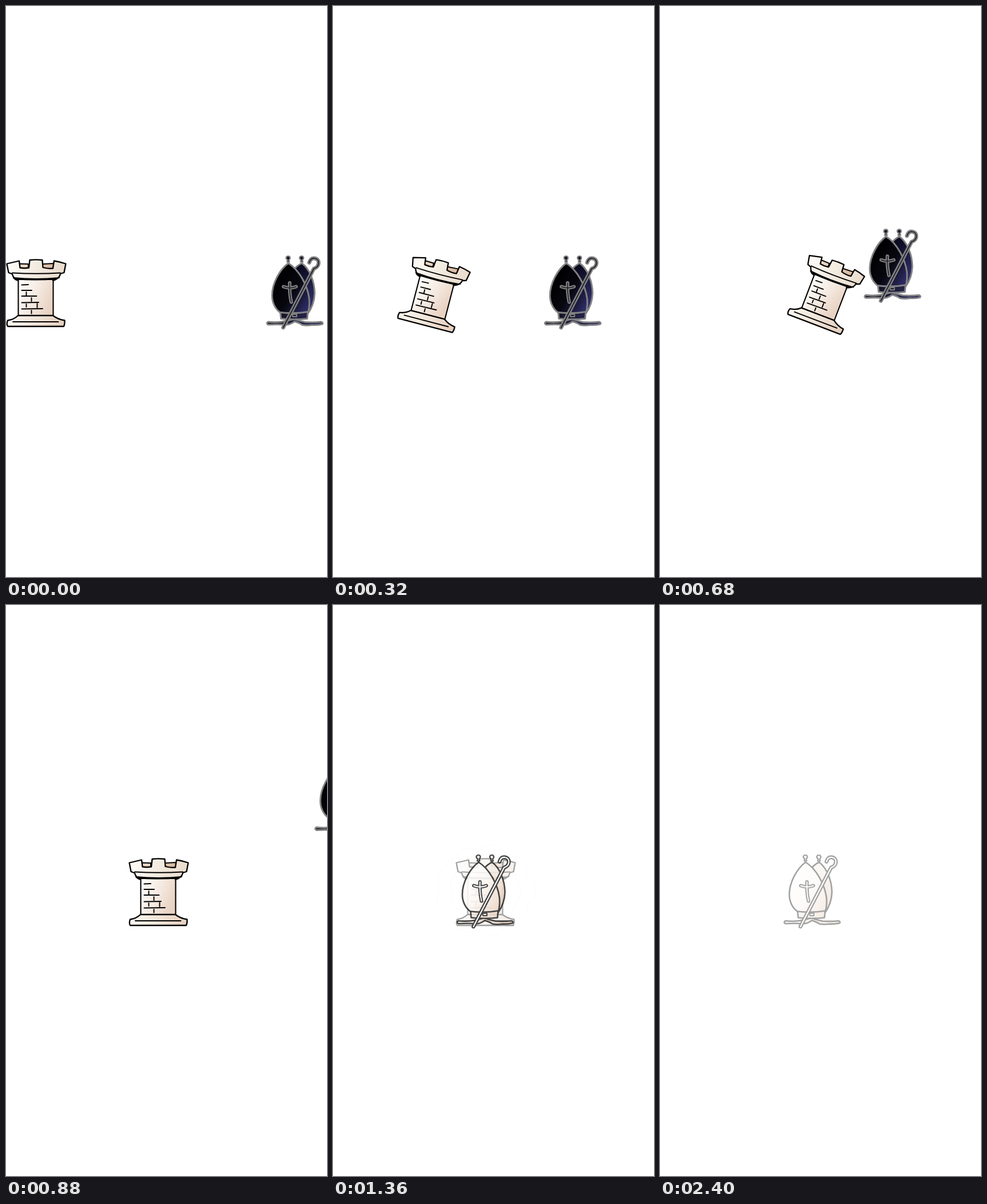
Write an HTML page with a canvas that moves like this. It is 561 px wide and 998 px high and loops after 2440 ms.

```html
<!DOCTYPE html>
<html lang="en">
<head>
<meta charset="utf-8">
<title>Rook takes bishop</title>
<style>
  html, body { margin: 0; width: 100%; height: 100%; overflow: hidden; background: #fff; }
  canvas { display: block; width: 561px; height: 998px; }
</style>
</head>
<body>
<canvas id="stage" width="561" height="998"></canvas>
<script>
const W = 561, H = 998, LOOP = 2440, STEP = 40;
const screen = document.getElementById('stage').getContext('2d');
const layer = document.createElement('canvas');
layer.width = W;
layer.height = H;
const pen = layer.getContext('2d');

const clamp = v => Math.max(0, Math.min(1, v));
const progress = (t, from, to) => clamp((t - from) / (to - from));

function gradient(x0, y0, x1, y1, ...colors) {
  const g = pen.createLinearGradient(x0, y0, x1, y1);
  colors.forEach((c, i) => g.addColorStop(i / (colors.length - 1), c));
  return g;
}

function shape(d, fill, stroke, width) {
  const path = new Path2D(d);
  if (fill) {
    pen.fillStyle = fill;
    pen.fill(path);
  }
  if (stroke) {
    pen.strokeStyle = stroke;
    pen.lineWidth = width;
    pen.stroke(path);
  }
}

// A line with an outer edge and a lighter or darker core
function tube(d, edge, core, outer, inner) {
  shape(d, null, edge, outer);
  shape(d, null, core, inner);
}

const ROOK = {
  notches: 'M237 450.5L253 451V459H237ZM278 451L297 450V460H278Z',
  crown: 'M215.5 450.5L237 445.5L238.5 457.5Q246 459 254 457.5L255.5 444Q266 442.8 277.5 444L278.5 457Q287 459.5 296 458.5L298 445.5Q308 447 318.5 450.5L315.5 466L309 468Q308 474 303 476.5Q267 480 231 477Q226 474 225 468.5L218.5 466Z',
  column: 'M235.5 478H296.5V541H235.5Z',
  base: 'M235 541H296Q305 548 316.5 549.5Q317 556 315 560H217Q214.5 556 217 549.5Q228 548 235 541Z',
  shade: 'M226 475Q230 477 236 477.5V481Q229 480 226 475ZM306 475Q301 477 295 477.5V481Q303 480 306 475Z',
  rims: 'M225 466.5Q267 469 309 466.5M227 475Q267 479 307 475M226 552H305.5',
  bricks: 'M241.5 487.5L253 487M241.5 497H259M241.5 507H267.5M241.5 518.5L271 518M241.5 529.5L278 529M249.5 500V506M258.5 510V516M249.5 521V526M268.5 520V527M258.5 532V537.5'
};

function drawRook() {
  const ink = '#000';
  shape(ROOK.notches, gradient(237, 450, 297, 450, '#ead9c8', '#d9b9a0'), ink, 2);
  shape(ROOK.column, gradient(235, 490, 296, 515, '#fffdfa', '#f5eae2', '#e8d2c2'), ink, 2.1);
  shape(ROOK.base, gradient(217, 545, 316, 560, '#fbf7f0', '#f0e4d8', '#e4cebd'), ink, 2.3);
  shape(ROOK.crown, gradient(216, 450, 318, 470, '#fefcf8', '#f3ebe0', '#e9dacb'), ink, 2.3);
  shape(ROOK.shade, ink);
  shape(ROOK.rims, null, ink, 1.9);
  shape(ROOK.bricks, null, ink, 1.9);
}

const BISHOP = {
  back: 'M262 463Q270 453 278 449.5C292 460 300 481 300.5 502C300 516 296 527 289 537L270 530Z',
  front: 'M254.5 449.5C240 460 226 484 226 506C226 519 232 530 240.5 536Q265 539 289 535.5Q292 525 291 512C288 488 273 461 254.5 449.5Z',
  band: 'M240.5 535.5Q265 538.5 288.5 534.5L287.5 546.5Q265 549 241.5 546.5Z',
  buckle: 'M261.5 539L269 538.5V543H262Z',
  foot: 'M219 552Q231 553.5 242 552Q253 550.5 264 547Q274 550.5 284 552.5Q298 553.5 312 552Q316 553.5 314 556Q306 558 296 557.5Q287 559 279 557.5Q271 552.5 265 551.5Q257 557.5 250 557Q235 556 219 557Q215 554.5 219 552Z',
  finial: 'M252 447.5L253 444Q250 442 250.5 439.5Q251.5 437 254 437Q257 437 257.5 439.5Q258 442 255.5 444L256.5 447.5Z',
  cross: 'M256.8 484Q256 501 259.5 517.5M246 490.5Q257 495 268 490.5',
  staff: 'M245.5 562L299 459C310 455.5 310 442 300 441C295.5 440.5 292.5 443.5 291 448.5'
};

const LIGHT = {
  ink: '#000', core: '#fff', line: 2.6, coreScale: 1,
  front: ['#ffffff', '#fbf5ef', '#e9d3c1'],
  back: ['#f5ebe1', '#e5cbb7'],
  foot: ['#f8f1ea', '#e0c2aa']
};
const DARK = {
  ink: '#828284', core: '#1c1c20', line: 2.9, coreScale: 0.75,
  front: ['#000002', '#07070f', '#2c2b62'],
  back: ['#0b0b20', '#302f66'],
  foot: ['#0c0c14', '#2f2e60']
};

function drawBishop(look) {
  const { ink, core, line, coreScale } = look;
  const trim = gradient(217, 540, 315, 556, ...look.foot);
  shape(BISHOP.back, gradient(268, 465, 300, 515, ...look.back), ink, line);
  shape(BISHOP.front, gradient(230, 485, 290, 522, ...look.front), ink, line);
  shape(BISHOP.foot, trim, ink, line);
  shape(BISHOP.band, trim, ink, line);
  shape(BISHOP.buckle, core, ink, 1.9);
  for (const dx of [0, 23.5]) {
    pen.save();
    pen.translate(dx, 0);
    shape(BISHOP.finial, trim, ink, 2.2);
    pen.restore();
  }
  tube(BISHOP.cross, ink, core, 6, 2 * coreScale);
  tube(BISHOP.staff, ink, core, 6.8, 2.2 * coreScale);
}

function drawSmoke(scale) {
  pen.translate(266, 498.5);
  pen.scale(scale, scale);
  const puffs = (rx, ry, r, color) => {
    pen.fillStyle = color;
    pen.beginPath();
    for (let i = 0; i < 9; i++) {
      const a = i * Math.PI * 2 / 9;
      const x = Math.cos(a) * rx, y = Math.sin(a) * ry;
      pen.moveTo(x + r, y);
      pen.arc(x, y, r, 0, Math.PI * 2);
    }
    pen.moveTo(rx, 0);
    pen.ellipse(0, 0, rx, ry, 0, 0, Math.PI * 2);
    pen.fill();
  };
  puffs(58, 50, 30, '#e4eef3');
  puffs(58, 50, 29, '#ffffff');
  puffs(38, 32, 25, '#d8e9f0');
  puffs(38, 32, 24, '#ffffff');
}

// Draws one object as a group so that its parts fade together
function group(draw, { x = 0, y = 0, angle = 0, alpha = 1 }) {
  if (alpha <= 0) return;
  const cx = 267.5, cy = 502;
  pen.setTransform(1, 0, 0, 1, 0, 0);
  pen.clearRect(0, 0, W, H);
  pen.translate(cx + x, cy + y);
  pen.rotate(angle);
  pen.translate(-cx, -cy);
  pen.lineJoin = pen.lineCap = 'round';
  draw();
  screen.globalAlpha = alpha;
  screen.drawImage(layer, 0, 0);
  screen.globalAlpha = 1;
}

function rookPose(t) {
  const back = 1 - progress(t, 600, 880);
  const charge = progress(t, 40, 600);
  return {
    x: (-214 + 247.5 * charge) * back,
    y: charge * back,
    angle: 0.51 * charge * back,
    alpha: 1 - progress(t, 1160, 1520)
  };
}

function victimPose(t) {
  const flight = Math.max(0, t - 600) / 280;
  return {
    x: 239 - 171.6 * progress(t, 40, 600) + 256 * flight,
    y: -163.5 * flight,
    alpha: t < 920 ? 1 : 0
  };
}

function render(t) {
  screen.fillStyle = '#fff';
  screen.fillRect(0, 0, W, H);
  group(drawRook, rookPose(t));
  group(() => drawBishop(DARK), victimPose(t));
  group(() => drawBishop(LIGHT), {
    alpha: progress(t, 1160, 1390) - 0.64 * progress(t, 2200, 2400)
  });
  const grow = progress(t, 960, 1180);
  const thin = 1 - progress(t, 1200, 1800);
  group(() => drawSmoke(1 - (1 - grow) ** 2), { alpha: 0.8 * grow * thin ** 5 });
}

const start = performance.now();
function tick() {
  const t = (performance.now() - start) % LOOP;
  render(Math.floor(t / STEP) * STEP);
  requestAnimationFrame(tick);
}
tick();
</script>
</body>
</html>
```
